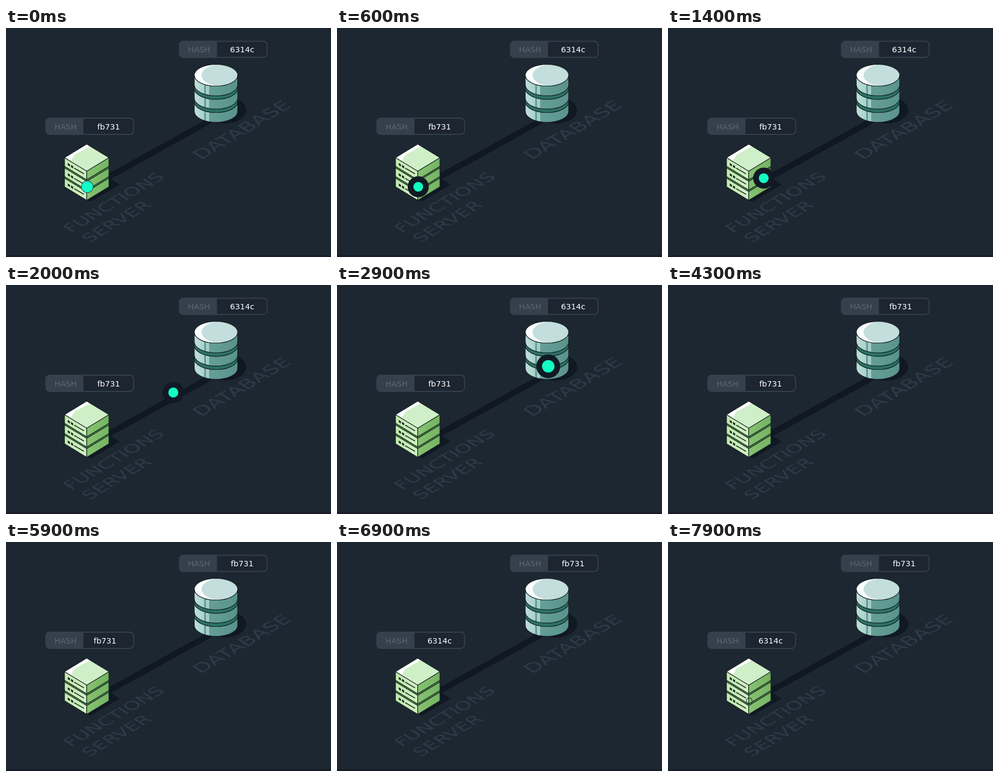
Write an HTML page that moves like this. It is 600 by 424 pixels and loops after 8 s.

```html
<!DOCTYPE html>
<html lang="en">
<head>
<meta charset="utf-8">
<title>Hash sync</title>
<style>
  html, body { margin: 0; width: 100%; height: 100%; overflow: hidden; background: #1d2732; }
  svg { display: block; width: 100vw; height: 100vh; }
  text { font-family: "DejaVu Sans", sans-serif; font-size: 14.5px; }
  .floor text { fill: #2f3a47; font-size: 30px; }
  .label { fill: #5d6773; }
  .hash { fill: #fff; text-anchor: middle; }
  .shadow { fill: #101823; }
  .edge { stroke: #14201f; stroke-width: 1.1; stroke-linejoin: round; }
</style>
</head>
<body>
<svg viewBox="0 0 600 424">
  <defs>
    <linearGradient id="side" gradientUnits="userSpaceOnUse" x1="348" x2="428" y1="0" y2="0">
      <stop offset="0" stop-color="#bfdfdc"/>
      <stop offset=".22" stop-color="#a9d1cc"/>
      <stop offset=".22" stop-color="#5e9a92"/>
      <stop offset=".265" stop-color="#5e9a92"/>
      <stop offset=".265" stop-color="#a4cdc8"/>
      <stop offset=".335" stop-color="#a4cdc8"/>
      <stop offset=".335" stop-color="#659f97"/>
      <stop offset="1" stop-color="#59938b"/>
    </linearGradient>
    <linearGradient id="leftFace" x1="0" x2="1" y1="0" y2="0">
      <stop offset="0" stop-color="#c0e8ab"/>
      <stop offset="1" stop-color="#d3f0c4"/>
    </linearGradient>
    <linearGradient id="rightFace" x1="0" x2="1" y1="0" y2="0">
      <stop offset="0" stop-color="#86c270"/>
      <stop offset="1" stop-color="#74b463"/>
    </linearGradient>
    <clipPath id="lid"><ellipse cx="387.700" cy="87.5" rx="40" ry="20"/></clipPath>
    <clipPath id="slot"><path d="M143 168h85q7 0 7 7v14q0 7-7 7h-85z"/></clipPath>
  </defs>

  <rect width="600" height="424" fill="#1d2732"/>
  <rect y="421" width="600" height="3" fill="#191a29"/>

  <g class="floor">
    <text transform="matrix(1 -.59 .82 .52 360 244.500)" style="font-size:32.5px">DATABASE</text>
    <text transform="matrix(1 -.59 .82 .52 120 380)">FUNCTIONS</text>
    <text transform="matrix(1 -.59 .82 .52 154 398.500)">SERVER</text>
  </g>

  <path d="M150 297.5 385 167" stroke="#101823" stroke-width="11"/>
  <ellipse class="shadow" cx="403" cy="152" rx="40.5" ry="25"/>
  <path class="shadow" d="M190 277 210 290 157 321 147 319z"/>

  <g id="database"></g>
  <g id="server"></g>
  <g id="tags"></g>

  <g id="dot">
    <circle id="halo" fill="#111a24"/>
    <circle id="core" fill="#12fcc4"/>
    <circle id="seed" fill="none" stroke="#1d3a2c" stroke-width="1.2"/>
  </g>
</svg>
<script>
const LOOP = 8000;
const SLIDE = 75;
const OLD_HASH = "6314c", NEW_HASH = "fb731";
const $ = id => document.getElementById(id);
const clamp = v => Math.min(1, Math.max(0, v));
const progress = (t, start, end) => clamp((t - start) / (end - start));
const inOutQuad = u => u < .5 ? 2 * u * u : 1 - 2 * (1 - u) ** 2;

function drawDatabase() {
  const wall = (y, h, fill) => `<path class="edge" fill="${fill}"
    d="M347.700 ${y}v${h}a40 20 0 0 0 80 0v${-h}a40 20 0 0 1-80 0z"/>`;
  let out = "";
  for (const i of [2, 1, 0]) {
    const y = 87.5 + i * 24.5;
    if (i < 2) out += wall(y + 18, 6.5, "#2c7265");
    out += wall(y, 18, "url(#side)");
  }
  $("database").innerHTML = out + `
    <ellipse cx="387.700" cy="87.5" rx="40" ry="20" fill="#fafdfd"/>
    <ellipse cx="399" cy="87.5" rx="38" ry="20.5" fill="#c3dedc" clip-path="url(#lid)"/>
    <ellipse class="edge" cx="387.700" cy="87.5" rx="40" ry="20" fill="none"/>`;
}

function drawServer() {
  let out = `<path class="edge" fill="#4b8548" d="M108 240 149 265 190 240V294L149 319 108 294z"/>`;
  for (let i = 0; i < 3; i++) {
    out += `<g transform="translate(0 ${i * 19})">
      <path class="edge" fill="url(#leftFace)" d="M108 240 149 265v16L108 256z"/>
      <path class="edge" fill="url(#rightFace)" d="M149 265 190 240v16L149 281z"/>
      <path fill="#182a2a" d="M114 250l4 2.4v4l-4-2.4zM120 253.5l4 2.4v4l-4-2.4z"/>
      <path stroke="#182a2a" stroke-width="1.6" d="M126 259.5 144 270"/></g>`;
  }
  $("server").innerHTML = out + `
    <path fill="#fff" d="M149 215 190 240 149 265 108 240z"/>
    <path fill="#cfefc8" d="M155 219 190 240 149 264 120 246 126 235z"/>
    <path class="edge" fill="none" d="M149 215 190 240 149 265 108 240z"/>`;
}

function drawTags() {
  const tag = (id, x, y) => `<g transform="translate(${x} ${y})">
    <rect x="73.5" y="167" width="162" height="30" rx="7" fill="#1c2530"/>
    <path fill="#35404d" d="M143 167H80.5q-7 0-7 7v16q0 7 7 7H143z"/>
    <rect x="73.5" y="167" width="162" height="30" rx="7" fill="none" stroke="#35404d" stroke-width="1.8"/>
    <text class="label" x="89.5" y="187.5">HASH</text>
    <g clip-path="url(#slot)"><text class="hash" id="${id}" y="187.5"></text></g></g>`;
  $("tags").innerHTML = tag("serverHash", 0, 0) + tag("databaseHash", 246.5, -142.5);
}

// The old value leaves to the left, then the new one returns from there.
function swapHash(id, t, start, before, after) {
  const middle = start + 450;
  const offset = t < middle
    ? progress(t, start, middle) ** 3
    : (1 - progress(t, middle, middle + 450)) ** 3;
  $(id).textContent = t < middle ? before : after;
  $(id).setAttribute("x", 189.5 - SLIDE * offset);
}

function tween(t, keys) {
  for (let i = 1; i < keys.length; i++) {
    const [a, from] = keys[i - 1], [b, to] = keys[i];
    if (t < b) return from + (to - from) * inOutQuad(progress(t, a, b));
  }
  return keys.at(-1)[1];
}

function render(t) {
  const reborn = t > 7800;
  const travel = reborn ? 0 : inOutQuad(progress(t, 1000, 2700));
  $("dot").setAttribute("transform", `translate(${150 + 240 * travel} ${294 - 143.5 * travel})`);
  $("halo").setAttribute("r", tween(t, [[0, 11.2], [500, 19.5], [2650, 19.5], [2900, 22], [3500, 0]]));
  $("core").setAttribute("r", tween(t, [[0, 10.6], [500, 9], [2650, 9.3], [2900, 11.5], [3450, 0]]));
  $("seed").setAttribute("r", 10.6 * progress(t, 7800, 8000));
  $("seed").setAttribute("visibility", reborn ? "visible" : "hidden");
  swapHash("databaseHash", t, 3600, OLD_HASH, NEW_HASH);
  swapHash("serverHash", t, 5700, NEW_HASH, OLD_HASH);
}

drawDatabase();
drawServer();
drawTags();
const began = performance.now();
function tick() {
  render((performance.now() - began) % LOOP);
  requestAnimationFrame(tick);
}
tick();
</script>
</body>
</html>
```
